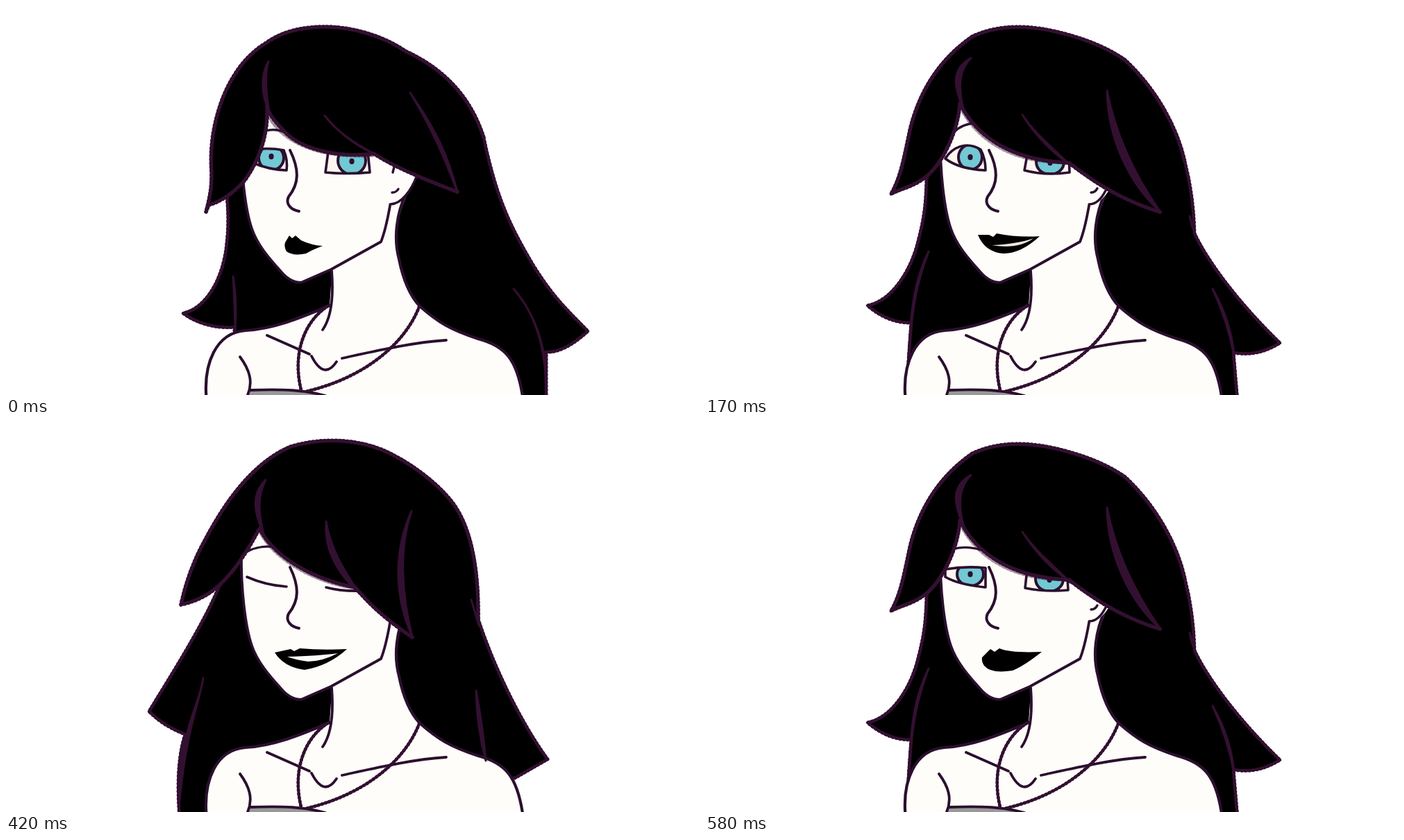
An HTML page with a canvas that plays this animation: 998 by 561 pixels, repeating every 660 ms.

```html
<!DOCTYPE html>
<html lang="en">
<head>
<meta charset="utf-8">
<title>Portrait loop</title>
<style>
html, body { margin: 0; width: 100%; height: 100%; overflow: hidden; background: #fff; }
canvas { display: block; width: 100vw; height: 100vh; }
</style>
</head>
<body>
<canvas id="stage" width="998" height="561"></canvas>
<script>
const ctx = document.getElementById('stage').getContext('2d');
const INK = '#2b0f2e', PLUM = '#331031', SKIN = '#fefdf9', IRIS = '#72c8d3';
const LOOP = 660;

const body = {
  skin: 'M289 570C283 515 303 471 345 468C390 465 430 447 466 432L470 375L553 286L592 244C562 295 558 335 566 365C572 395 582 418 596 433C622 456 640 467 680 480C718 490 737 508 745 570',
  outline: 'M289 570C283 515 303 471 345 468C390 465 430 447 466 432M577 268C562 300 558 335 566 365C572 395 582 418 596 433C622 456 640 467 680 480C718 490 737 508 745 570',
  dress: 'M347 565L352 554C400 552 430 554 460 562L460 565Z',
  lines: 'M352 554C400 552 430 554 460 562M337 506C351 525 356 542 348 561M376 475L437 502M440 505Q458 540 476 513M484 508C530 498 585 485 634 482M469 382C472 420 468 450 456 467',
  cord: 'M463 433C430 455 412 500 425 554M595 434C575 485 520 535 432 556'
};

const face = {
  skin: 'M339 185C338 240 345 295 354 321C362 345 380 365 396 383C405 394 418 401 427 398L468 380L540 340C546 325 550 305 553 288C570 286 583 268 592 244L560 190L400 130L366 135Z',
  jaw: 'M339 187C338 240 345 295 354 321C362 345 380 365 396 383C405 394 418 401 427 398L468 380L540 340C546 325 550 305 553 288',
  nose: 'M409 208C422 235 423 255 407 275C402 285 410 294 422 296'
};

// back and front are left open so only the true silhouette gets a rim
const hairs = {
  tilt: {
    back: 'M688 190C705 270 722 312 760 375C790 423 810 440 838 469C815 490 795 500 778 499L778 570L745 570L600 470L466 470L345 492L329 468L330 463C300 466 272 456 255 443C285 437 310 400 317 350C322 310 319 290 318 272L335 200',
    front: 'M650 268C610 253 560 233 530 213C470 220 420 203 400 180C386 165 378 155 376 145C378 190 362 225 345 250C330 268 310 282 292 287L288 297C295 270 296 260 296 240C293 200 300 165 312 133C328 93 350 68 375 53C400 35 430 30 460 30C500 30 545 44 575 65C640 95 672 140 688 190',
    fringe: 'M377 150C385 180 430 220 528 214',
    locks: 'M378 80C366 100 368 130 379 152C375 130 372 100 378 80ZM459 158Q488 194 530 213Q480 187 459 158ZM582 125C620 180 636 215 650 268C630 215 615 180 582 125ZM327 390Q333 425 330 466Q329 425 327 390ZM731 408Q767 450 776 510L778 561Q778 460 731 408Z',
    ear: 'M553 286C570 286 584 265 592 244M557 240L560 228M556 269Q562 269 565 264'
  },
  rest: {
    back: 'M691 225C699 255 704 290 705 328C722 365 765 425 828 486C805 500 785 504 761 500L767 570L745 570L600 470L466 470L345 500L292 525L297 457C275 457 255 450 234 432C270 425 298 380 308 335C317 300 318 280 319 250L335 200',
    front: 'M655 297C610 283 570 262 524 226C430 223 385 178 367 140C365 180 340 235 310 252C295 262 280 264 268 271C283 245 287 215 296 175C310 120 340 75 385 44C430 23 480 29 525 42C560 52 585 64 605 78C650 120 680 175 691 225',
    fringe: 'M368 143C387 183 432 224 516 224',
    locks: 'M383 75C352 92 360 120 372 148C364 115 366 92 383 75ZM457 157C478 190 500 210 526 230C500 203 478 188 457 157ZM579 122C580 190 610 255 655 296C623 250 592 190 579 122ZM322 354C302 395 297 430 293 505C299 430 305 400 322 354ZM731 408Q753 455 762 505Q758 455 731 408ZM698 303L706 329L701 317Z',
    ear: 'M553 286Q567 286 577 266M556 269Q562 269 565 263'
  },
  bow: {
    back: 'M680 283C702 350 740 430 780 485L733 512L700 510L600 470L466 470L345 500L289 570L250 570C246 520 248 480 258 449C235 440 220 430 206 416C240 360 288 285 310 228L345 180',
    front: 'M585 309C560 292 530 270 503 237C452 228 388 198 365 152C345 190 325 220 300 240Q280 256 252 262C260 225 272 195 287 168C315 115 355 57 410 34C460 19 510 25 545 40C580 56 617 83 640 111C668 145 681 205 680 283',
    fringe: 'M366 154C388 199 450 229 503 237',
    locks: 'M374 82C350 105 360 135 371 160C363 128 362 105 374 82ZM461 142C458 180 475 215 510 247C486 213 467 180 461 142ZM584 127C560 180 557 245 585 308C569 245 566 180 584 127ZM284 368C278 410 250 440 250 545C260 440 277 410 284 368ZM677 386Q678 440 691 487Q687 440 677 386ZM670 255L681 292L676 275Z',
    ear: ''
  }
};

// each ball: centre, radii, pupil height
const eyes = {
  shy: {
    shapes: ['M358 207Q380 204 400 208Q406 222 404 237Q378 236 355 226Z', 'M464 210L460 240Q490 243 524 240L521 210Z'],
    balls: [[382, 219, 18, 18, 217], [498, 223, 20, 20, 224]],
    brow: 'M374 180Q392 175 408 186'
  },
  wide: {
    shapes: ['M346 220C356 204 376 194 397 207Q404 220 404 237Q365 235 346 220Z', 'M464 215L460 237Q490 245 525 240L524 215Z'],
    balls: [[382, 218, 17, 18, 218], [497, 225, 20, 18, 226]],
    brow: 'M358 182Q373 168 393 169'
  },
  lazy: {
    shapes: ['M346 211Q375 206 404 209L404 237Q365 233 346 222Z', 'M464 210L461 238Q490 244 523 241L521 210Z'],
    balls: [[382, 218, 19, 17, 218], [496, 225, 20, 18, 226]],
    brow: 'M356 182Q380 175 408 187'
  },
  shut: { lids: 'M347 222Q374 234 404 236M461 237Q482 243 512 242', brow: 'M340 190C358 177 380 175 402 183' },
  lash: { lids: 'M347 222Q374 234 404 236M461 237Q482 243 512 242M490 249L507 242', brow: 'M340 190C358 177 380 175 402 183' }
};

const mouths = {
  pout: ['M402 341L408 331L412 335L417 331L425 338Q440 345 456 346Q440 352 432 357Q414 361 404 354Q400 347 402 341Z'],
  smirk: ['M399 338L411 326L417 330L424 325Q440 332 485 330Q460 350 443 357Q412 362 402 350Q398 344 399 338Z'],
  part: ['M393 330L409 330L415 333L420 328Q450 334 482 332Q455 357 430 357Q403 355 393 330Z', 'M413 345Q450 343 473 335Q452 351 413 345Z', '#f6e3da'],
  smile: ['M382 328Q400 329 411 327L417 332L424 326Q450 333 488 327Q465 355 430 355Q400 352 382 328Z', 'M399 338Q445 340 477 333Q450 348 430 347Q410 345 399 338Z', SKIN],
  grin: ['M380 324Q400 330 411 326L417 329L424 325Q450 329 491 320Q467 356 435 355Q401 352 380 324Z', 'M397 336Q440 340 475 330Q455 344 435 345Q412 344 397 336Z', '#fcf5ec'],
  beam: ['M387 331L410 326L415 329L423 325Q455 328 491 326Q465 350 430 356Q400 352 387 331Z', 'M405 337Q450 336 478 332Q455 344 435 344Q418 342 405 337Z', SKIN]
};

// end time, hair, eyes, mouth
const poses = [
  [80, 'tilt', 'shy', 'pout'],
  [170, 'rest', 'lazy', 'smirk'],
  [250, 'rest', 'wide', 'part'],
  [330, 'rest', 'wide', 'smile'],
  [420, 'bow', 'lash', 'grin'],
  [500, 'bow', 'shut', 'beam'],
  [580, 'rest', 'wide', 'part'],
  [LOOP, 'rest', 'lazy', 'smirk']
];

function fill(d, color) {
  ctx.fillStyle = color;
  ctx.fill(new Path2D(d));
}

function line(d, width, color = INK, dash = []) {
  ctx.strokeStyle = color;
  ctx.lineWidth = width;
  ctx.setLineDash(dash);
  ctx.stroke(new Path2D(d));
}

// a firm line with small bumps along it
function rough(d, width) {
  line(d, width, PLUM);
  line(d, width + 0.9, PLUM, [0.5, 5]);
}

function drawBody() {
  fill(body.skin, SKIN);
  fill(body.dress, '#999');
  line(body.outline, 4.2);
  line(body.lines, 3.8);
  rough(body.cord, 4);
}

function drawEye(shape, [x, y, rx, ry, pupilY]) {
  fill(shape, '#fdf6ef');
  ctx.save();
  ctx.clip(new Path2D(shape));
  ctx.setLineDash([]);
  ctx.beginPath();
  ctx.ellipse(x, y, rx, ry, 0, 0, Math.PI * 2);
  ctx.fillStyle = IRIS;
  ctx.fill();
  ctx.strokeStyle = INK;
  ctx.lineWidth = 4;
  ctx.stroke();
  ctx.beginPath();
  ctx.ellipse(x, pupilY, 3.6, 4.2, 0, 0, Math.PI * 2);
  ctx.fillStyle = INK;
  ctx.fill();
  ctx.restore();
  line(shape, 3.6);
}

function drawFace(look, mouth, ear) {
  fill(face.skin, SKIN);
  line(face.jaw, 3.8);
  line(face.nose, 4);
  line(ear, 3.4);
  line(look.brow, 3.4);
  if (look.lids) line(look.lids, 3.6);
  else look.shapes.forEach((shape, i) => drawEye(shape, look.balls[i]));
  const [lips, teeth, tone] = mouth;
  fill(lips, '#000');
  if (teeth) fill(teeth, tone);
}

function drawBack(hair) {
  fill(hair.back, '#000');
  rough(hair.back, 4.2);
}

function drawFront(hair) {
  line(hair.fringe, 8, 'rgba(51,16,49,.45)', [1, 5]);
  fill(hair.front, '#000');
  rough(hair.front, 4.8);
  fill(hair.locks, PLUM);
  line(hair.locks, 3, PLUM);
}

function render(now) {
  const t = now % LOOP;
  const [, hairName, eyeName, mouthName] = poses.find(pose => t < pose[0]);
  const hair = hairs[hairName];
  ctx.fillStyle = '#fff';
  ctx.fillRect(0, 0, 998, 561);
  drawBack(hair);
  drawBody();
  drawFace(eyes[eyeName], mouths[mouthName], hair.ear);
  drawFront(hair);
}

ctx.lineCap = ctx.lineJoin = 'round';
const start = performance.now();
function tick() {
  render(performance.now() - start);
  requestAnimationFrame(tick);
}
tick();
</script>
</body>
</html>
```
